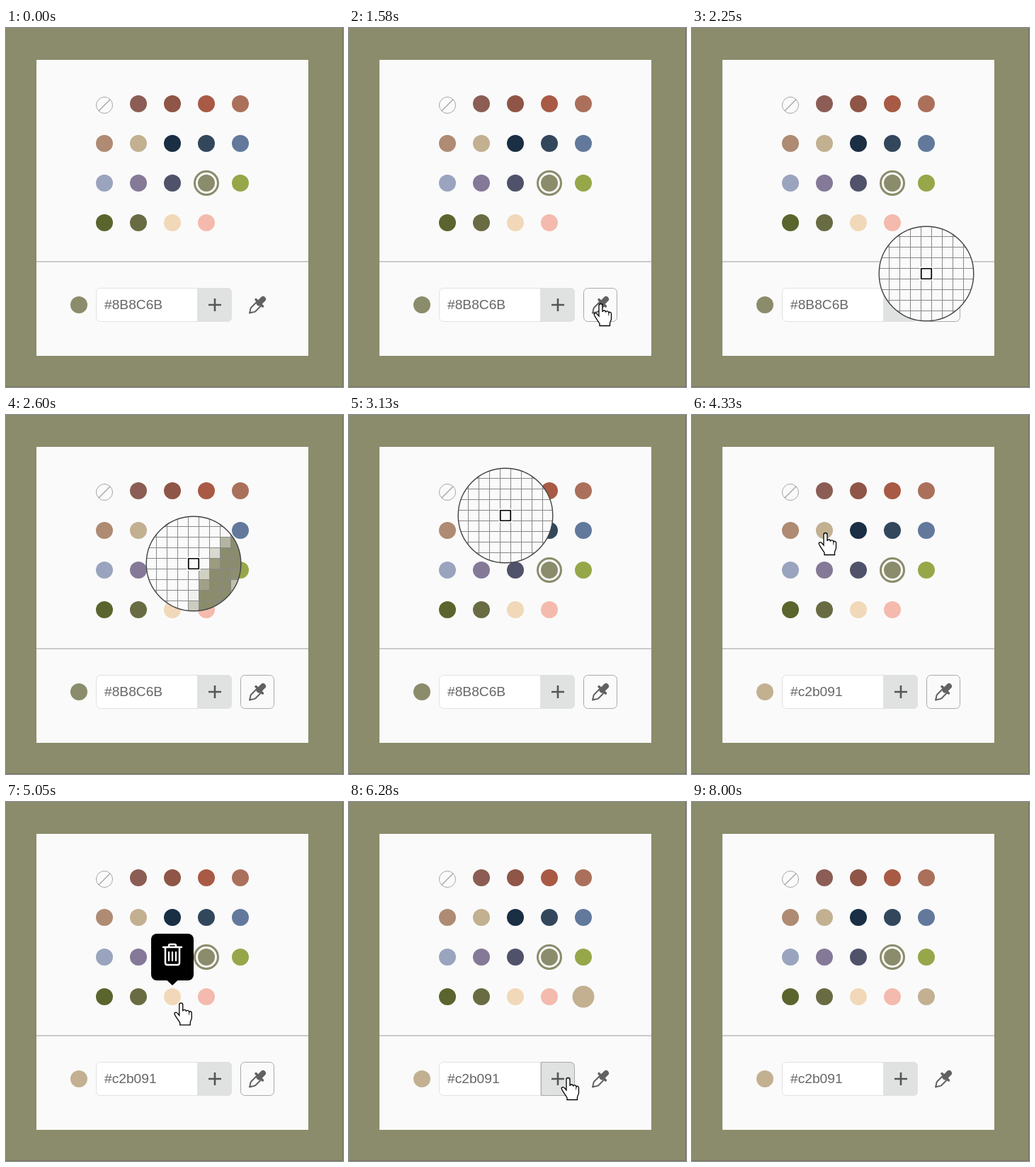
Write an HTML page with a canvas that moves like this. It is 476 by 507 pixels and loops after 8.14 s.

```html
<!DOCTYPE html>
<html lang="en">
<head>
<meta charset="utf-8">
<title>Colour picker</title>
<style>
html, body { margin: 0; width: 100%; height: 100%; overflow: hidden; background: #8b8c6b; }
canvas { display: block; }
#hex {
  position: absolute; left: 139px; top: 367px;
  font: 19.2px/48px "Liberation Sans", Arial, sans-serif; color: #666;
}
</style>
</head>
<body>
<canvas id="stage" width="476" height="507"></canvas>
<span id="hex"></span>
<script>
const LOOP = 8140;
const OLIVE = '#8b8c6b', SAND = '#c2b091', ICON = '#616161';
const canvas = document.getElementById('stage');
const hex = document.getElementById('hex');
const ctx = canvas.getContext('2d');

const colors = [
  null, '#8b5d54', '#8f5546', '#a85a45', '#ab705b',
  '#ae8b72', SAND, '#1a2e44', '#33475c', '#62799b',
  '#9aa4be', '#857998', '#50526a', OLIVE, '#96a74a',
  '#5a652d', '#696c42', '#f1d8b8', '#f4baad'
];
const spot = i => [139 + 48 * (i % 5), 107 + 56 * Math.floor(i / 5)];

const clamp = v => Math.max(0, Math.min(1, v));
const ramp = (t, a, b) => clamp((t - a) / (b - a));
const linear = p => p;
const easeIn = p => p * p;
const easeOut = p => 1 - (1 - p) ** 2;
const smooth = p => p * p * (3 - 2 * p);
const backOut = p => 1 + 4.6 * (p - 1) ** 3 + 3.6 * (p - 1) ** 2;

// start, end, easing, then a quadratic curve: from, control, to
const moves = [
  [440, 1100, easeOut, 404, 495, 378, 430, 355, 389],
  [2040, 2850, smooth, 357, 389, 275, 262, 251, 164],
  [2930, 3610, easeOut, 251, 164, 221, 120, 191, 164],
  [3800, 3860, linear, 191, 164, 189, 165, 188, 166],
  [4850, 5470, easeOut, 189, 166, 234, 270, 309, 389],
  [6680, 7010, easeIn, 309, 389, 350, 440, 398, 502]
];

function pointer(t) {
  const [a, b, ease, x0, y0, x1, y1, x2, y2] = moves.filter(m => m[0] <= t).pop() || moves[0];
  const p = ease(ramp(t, a, b)), q = 1 - p;
  const curve = (u, v, w) => q * q * u + 2 * p * q * v + p * p * w;
  return [curve(x0, x1, x2), curve(y0, y1, y2)];
}

function rect(x, y, w, h, color) {
  ctx.fillStyle = color;
  ctx.fillRect(x, y, w, h);
}

function disc(x, y, r, color) {
  ctx.beginPath();
  ctx.arc(x, y, r, 0, 7);
  ctx.fillStyle = color;
  ctx.fill();
}

function ring(x, y, r, width, color) {
  ctx.beginPath();
  ctx.arc(x, y, r, 0, 7);
  stroke(width, color);
}

function stroke(width, color, path) {
  ctx.lineWidth = width;
  ctx.strokeStyle = color;
  path ? ctx.stroke(new Path2D(path)) : ctx.stroke();
}

function box(x, y, w, h, radii, fill, border) {
  ctx.beginPath();
  ctx.roundRect(x, y, w, h, radii);
  if (fill) { ctx.fillStyle = fill; ctx.fill(); }
  if (border) stroke(1, border);
}

function faded(alpha, draw) {
  ctx.globalAlpha = alpha;
  draw();
  ctx.globalAlpha = 1;
}

function drawSwatches(t) {
  colors.forEach((color, i) => {
    const [x, y] = spot(i);
    if (color) disc(x, y, 12, color);
  });
  ring(139, 109, 11.5, 1, '#a6a6a6');
  stroke(1.5, '#a6a6a6', 'M131 117L147 101');
  ring(283, 219, 16.5, 3, OLIVE);
  if (t >= 5930) {
    const [x, y] = spot(19);
    disc(x, y, 12 * Math.max(0, backOut(ramp(t, 5900, 6540))), SAND);
  }
}

function drawControls(t, color) {
  disc(103, 391, 12, color);
  box(127.5, 367.5, 191, 47, 6, '#fff', '#dfe1e0');
  box(270, 367, 49, 48, [0, 6, 6, 0], '#e0e2e1');
  stroke(2.6, '#555', 'M286 391H304M295 382V400');
  const focus = t < 8000 ? ramp(t, 5880, 6080) * (t >= 5930) : 0;
  faded(focus, () => box(271.5, 367.5, 47, 47, [0, 6, 6, 0], null, '#aaa'));
  const pressed = ramp(t, 1380, 1580) * (t >= 1430) * (1 - ramp(t, 5930, 6080));
  faded(pressed, () => box(331.5, 367.5, 47, 47, 6, null, '#aaa'));

  ctx.lineCap = ctx.lineJoin = 'round';
  stroke(2, ICON, 'M354 387L346.5 394.5Q345 396 345 399L344 402.5L348 401.5Q351 401.5 352.5 400L360 392.5');
  stroke(8, ICON, 'M363 383L357.5 388.5');
  stroke(3.4, ICON, 'M353 383.5L362.5 393');
  ctx.lineCap = 'butt';
  ctx.lineJoin = 'miter';
}

function drawLens(x, y) {
  x = Math.round(x);
  y = Math.round(y);
  ctx.save();
  ctx.beginPath();
  ctx.arc(x, y, 67, 0, 7);
  ctx.clip();
  ctx.imageSmoothingEnabled = false;
  ctx.drawImage(canvas, x - 4, y - 4, 9, 9, x - 67.5, y - 67.5, 135, 135);
  for (let d = -52.5; d < 60; d += 15)
    stroke(1, '#888', `M${x + d} ${y - 68}v136M${x - 68} ${y + d}h136`);
  ctx.restore();
  ring(x, y, 66.8, 1.4, '#444');
  stroke(1.5, '#fff', `M${x - 8.75} ${y - 8.75}h17.5v17.5h-17.5z`);
  stroke(1.7, '#000', `M${x - 7.25} ${y - 7.25}h14.5v14.5h-14.5z`);
}

function drawTooltip(x, y) {
  ctx.save();
  ctx.translate(x, y);
  box(-30, -89, 60, 66, 8, '#000');
  ctx.fill(new Path2D('M-8 -23.5H8L0 -16z'));
  ctx.lineCap = ctx.lineJoin = 'round';
  stroke(2.5, '#fff', 'M-13 -70H13M-5 -70V-72Q-5 -74 -3 -74H3Q5 -74 5 -72V-70M-10 -70V-48Q-10 -45 -7 -45H7Q10 -45 10 -48V-70');
  stroke(2.2, '#fff', 'M-5 -63V-51M0 -63V-51M5 -63V-51');
  ctx.restore();
}

const handShape = new Path2D(
  'M-2 16V3a2.5 2.5 0 0 1 5 0v9c0-3 5-2.5 4.5.5c.5-2.5 4.5-2 4.5 1c.5-2 3.5-1.5 3.5 1' +
  'v7c0 3-2 4-2 6.5V31.5H-1v-3C-3 25-7 20-8.5 16.5c-1-2.5 2-4 4-1.5L-2 18z');

function drawHand(x, y) {
  ctx.save();
  ctx.translate(x, y);
  ctx.fillStyle = '#fff';
  ctx.fill(handShape);
  ctx.lineWidth = 1.3;
  ctx.strokeStyle = '#000';
  ctx.stroke(handShape);
  ctx.restore();
}

function draw(t) {
  const picked = t >= 4330;
  const [x, y] = pointer(t);
  rect(0, 0, 476, 507, OLIVE);
  rect(475, 0, 1, 507, '#74755b');
  rect(0, 506, 476, 1, '#74755b');
  rect(43, 45, 384, 418, '#fafafa');
  rect(43, 329, 384, 2, '#cbcbcb');
  drawSwatches(t);
  drawControls(t, picked ? SAND : OLIVE);
  hex.textContent = picked ? SAND : '#8B8C6B';

  if (t >= 2040 && !picked) drawLens(x, y);
  if (t >= 4390 && t < 5930) {
    const over = colors.findIndex((c, i) => c && Math.hypot(spot(i)[0] - x, spot(i)[1] - y) < 15);
    if (over > 0) drawTooltip(...spot(over));
  }
  if ((t >= 440 && t < 2040) || (picked && t < 7010)) drawHand(x, y);
}

const begin = performance.now();
function tick() {
  draw((performance.now() - begin) % LOOP);
  requestAnimationFrame(tick);
}
tick();
</script>
</body>
</html>
```
